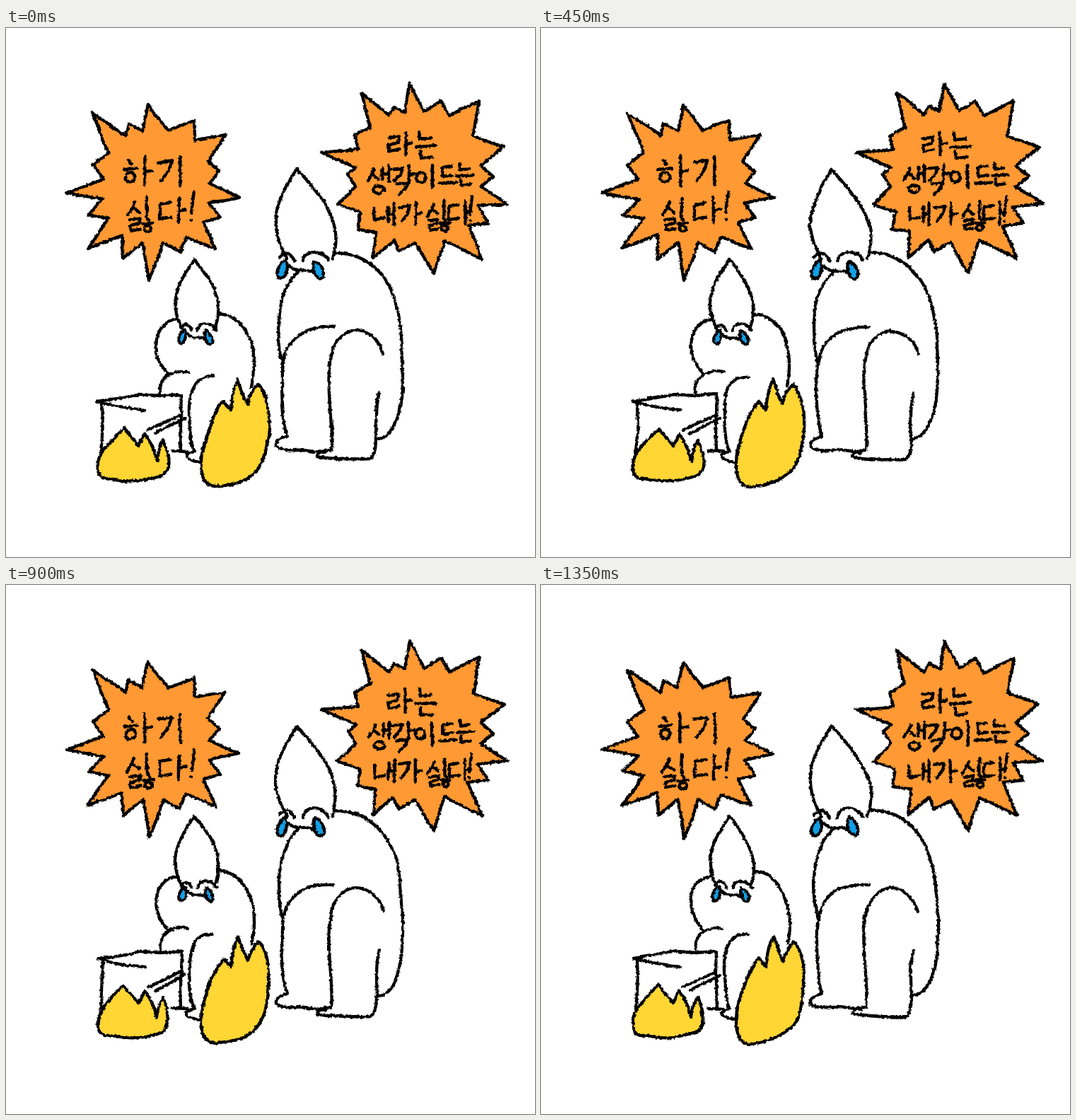
Recreate the animation shown at these times as an HTML page. Size 748 by 748 pixels, loop 1.5 s.

```html
<!DOCTYPE html>
<html lang="ko">
<head>
<meta charset="utf-8">
<title>하기 싫다!</title>
<style>
  html, body { margin: 0; width: 100%; height: 100%; overflow: hidden; background: #fff; }
  svg { display: block; width: 100%; height: 100%; }
  #ink { fill: none; stroke: #000; stroke-width: 4.3; stroke-linecap: round; stroke-linejoin: round; }
  #ink path { vector-effect: non-scaling-stroke; }
</style>
</head>
<body>
<svg viewBox="0 0 748 748">
  <defs>
    <filter id="chalk" filterUnits="userSpaceOnUse" x="0" y="0" width="748" height="748" color-interpolation-filters="sRGB">
      <feTurbulence id="sway" type="fractalNoise" baseFrequency="0.022" numOctaves="1" result="sway"/>
      <feTurbulence id="grain" type="fractalNoise" baseFrequency="0.26" numOctaves="2" result="grain"/>
      <feDisplacementMap in="SourceGraphic" in2="sway" scale="5" xChannelSelector="R" yChannelSelector="G" result="bent"/>
      <feDisplacementMap in="bent" in2="grain" scale="4" xChannelSelector="R" yChannelSelector="G" result="rough"/>
      <feGaussianBlur in="rough" stdDeviation="0.35"/>
    </filter>
  </defs>
  <g id="paint"></g>
  <g id="ink" filter="url(#chalk)" role="img" aria-label="하기 싫다! 라는 생각이 드는 내가 싫다!"></g>
</svg>
<script>
const byId = id => document.getElementById(id);
const orange = '#ff9933', yellow = '#ffd633', blue = '#129fe6';

function add(parent, attrs) {
  const el = document.createElementNS('http://www.w3.org/2000/svg', 'path');
  for (const k in attrs) el.setAttribute(k, attrs[k]);
  parent.append(el);
}
const line = (d, transform = '') => add(byId('ink'), { d, transform });
function filled(d, fill, transform = '') {
  add(byId('paint'), { d, fill, transform });
  line(d, transform);
}

// Spikes around a rounded core; each notch lies halfway between two tips.
function burst(cx, cy, rx, ry, tips) {
  const pts = tips.split(' ').map(p => p.split(',').map(Number));
  const angle = ([x, y]) => Math.atan2(y - cy, x - cx);
  const outline = pts.flatMap((tip, i) => {
    const a = angle(tip);
    const step = angle(pts[(i + 1) % pts.length]) - a;
    const mid = a + (step < 0 ? step + 2 * Math.PI : step) / 2;
    const bulge = 1 + .08 * Math.sin(2 * mid) ** 2;
    return [tip, [cx + rx * bulge * Math.cos(mid), cy + ry * bulge * Math.sin(mid)]];
  });
  filled('M' + outline.join('L') + 'Z', orange);
}

// Pen shapes in a 10 by 10 box.
const pen = {
  'ㄱ': 'M0,0L10,-1L8,4L2,10',
  'ㄴ': 'M0,0L.5,9L10,7.5',
  'ㄷ': 'M9,0L0,1L0,10L10,9',
  'ㄹ': 'M0,1L10,0L9,4L0,6L1,10L10,8.5',
  'ㅅ': 'M6,0L4,4L0,10M4,4L10,8',
  'ㅇ': 'M5,1.5a4.5,3.5 0 1 0 .1,0',
  'ㅎ': 'M4,-1L6,1M0,4L10,3.3M5,5.5a3.5,2.6 0 1 0 .1,0',
  'ㅏ': 'M0,0V10M0,5.2L10,4.8',
  'ㅐ': 'M-4,1.5V8.5M-4,5H4M6,0V10',
  'ㅣ': 'M0,0V10',
  'ㅡ': 'M0,0L10,-.6',
  '!': 'M2,0L0,7.5M0,10h.1'
};

// Places the parts of one syllable as Hangul blocks do.
function syllable(parts, x, y, h) {
  const w = .8 * h;
  const put = (part, px, py, pw, ph) => line(pen[part],
    `translate(${x + px * w} ${y + py * h}) scale(${pw * w / 10} ${ph * h / 10})`);
  const [first, vowel, ...last] = parts;
  if (!vowel) return put(first, 0, -.17, .5, .86);
  const closed = last.length > 0;
  if (vowel === 'ㅡ') {
    put(first, .15, closed ? 0 : .12, .5, closed ? .27 : .42);
    put(vowel, 0, closed ? .5 : .82, .85, .5);
  } else {
    put(first, 0, closed ? .12 : .15, .46, closed ? .42 : .5);
    put(vowel, .73, 0, .26, closed ? .56 : .78);
  }
  const lastW = last.length > 1 ? .4 : .5;
  last.forEach((part, i) => put(part, (last.length > 1 ? .08 : .2) + i * .5, .64, lastW, vowel === 'ㅡ' ? .27 : .36));
}
const write = (text, x, y, h, pitch) =>
  text.split(' ').forEach((parts, i) => syllable(parts, x + i * pitch, y, h));

// Leaf-shaped head hanging from its tip.
function head(x, y, half, h, lean) {
  const side = dir => Array.from({ length: 25 }, (_, i) => {
    const v = i / 25;
    return [x + lean * v + dir * half * Math.sin(2.35 * v), y + h * v];
  });
  line('M' + [...side(-1).reverse(), ...side(1)].join('L'));
}

function face(x, y, s) {
  const at = `translate(${x} ${y}) scale(${s})`;
  line('M-28,-5Q-15,-18 -6,0M6,0C8,-16 32,-18 42,-1M-14,7Q-6,15 5,14T20,17', at);
  const drop = 'M0,-14C9,-6 9,13 0,13S-8,-6 0,-14Z';
  filled(drop, blue, `${at} translate(-24 12) rotate(17)`);
  filled(drop, blue, `${at} translate(27 13) rotate(-20)`);
}

burst(213, 224, 76, 80, '201,109 266,131 310,152 302,203 329,239 303,268 297,312 246,317 ' +
  '202,357 166,326 115,312 116,264 86,233 122,193 122,120 173,135');
burst(583, 211, 89, 93, '570,79 615,103 669,102 704,168 689,210 709,249 682,276 673,326 605,347 ' +
  '555,316 519,325 497,285 469,249 483,207 446,176 493,152 503,92 549,111');

write('ㅎㅏ ㄱㅣ', 166, 182, 52, 50);
write('ㅅㅣㄹㅎ ㄷㅏ !', 172, 240, 46, 45);
write('ㄹㅏ ㄴㅡㄴ', 540, 147, 42, 39);
write('ㅅㅐㅇ ㄱㅏㄱ ㅇㅣ', 513, 194, 41, 33);
write('ㄷㅡ ㄴㅡㄴ', 613, 191, 35, 24);
write('ㄴㅐ ㄱㅏ', 521, 248, 39, 35);
write('ㅅㅣㄹㅎ ㄷㅏ !', 596, 245, 40, 30);

// Tall figure
head(411, 199, 42, 133, 19);
face(414, 329, 1);
line('M416,342C382,372 380,420 391,473');
line('M465,318C515,318 548,355 556,410S568,578 526,580');
line('M463,423C405,420 388,455 390,500Q390,550 398,578Q380,582 382,592Q390,600 420,596L452,600');
line('M533,461C520,420 478,418 463,452C448,492 464,560 460,597Q440,598 440,606Q480,612 515,610Q524,606 524,580Q521,535 527,516');

// Small figure
head(266, 327, 31, 103, 6);
face(267, 428, .75);
line('M241,412C208,416 203,462 228,487');
line('M302,404C342,408 358,457 348,507');
line('M257,486C235,481 215,495 218,516');
line('M293,493C266,492 258,515 259,545Q260,590 267,599Q250,602 258,609Q265,613 275,614');
line('M236,598L257,599');

// Box
line('M130,528Q160,524 190,518L218,520L248,518Q246,560 248,596');
line('M197,540Q165,538 130,528M136,532Q138,565 134,599');
line('M201,569L247,547M211,574L252,552');

// Flames
filled('M167,566L187,591L196,574Q207,592 213,612Q215,592 222,583Q238,622 220,633C200,640 178,644 150,637C122,642 127,608 140,594Q150,582 167,566Z', yellow);
filled('M308,528L318,540Q320,515 328,497Q334,516 342,532Q346,515 357,504C373,520 376,560 368,594C362,634 330,645 296,649C270,648 274,605 282,582Q291,548 308,528Z', yellow);

// The outlines are redrawn ten times per loop.
const HOLD = 150, POSES = 10;
let start, shown = -1;
function tick(now) {
  start ??= now;
  const pose = Math.floor((now - start) / HOLD) % POSES;
  if (pose !== shown) {
    shown = pose;
    byId('sway').setAttribute('seed', 11 + pose * 7);
    byId('grain').setAttribute('seed', 3 + pose * 5);
  }
  requestAnimationFrame(tick);
}
requestAnimationFrame(tick);
</script>
</body>
</html>
```
